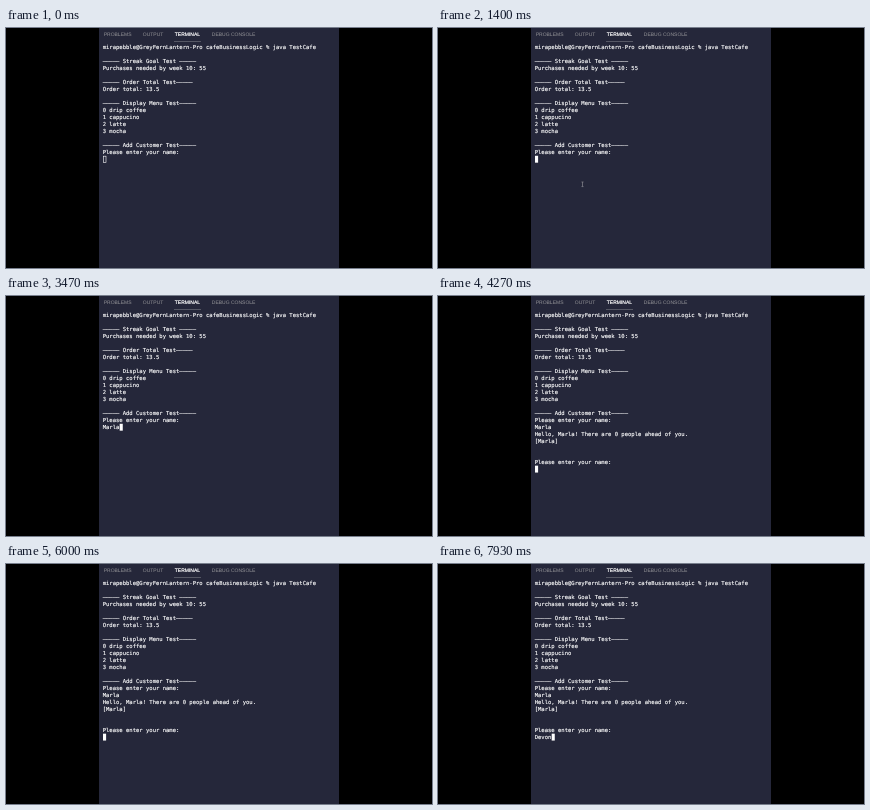
These frames come from a looping animation (426 by 240 pixels, 8 s). An HTML page with a canvas:

```html
<!DOCTYPE html>
<html lang="en">
<head>
<meta charset="utf-8">
<title>Terminal session</title>
<style>
  html, body { margin: 0; width: 100%; height: 100%; overflow: hidden; background: #000; }
  canvas { display: block; width: 426px; height: 240px; }
</style>
</head>
<body>
<canvas id="stage"></canvas>
<script>
const W = 426, H = 240, LOOP = 8000;
const PANEL = { x: 93, w: 240, color: '#25273a' };
const CELL = { x: 96.7, y: 19.4, w: 3.333, h: 6.98 };
const RULE = '—'.repeat(5);

const canvas = document.getElementById('stage');
const ctx = canvas.getContext('2d');
const dpr = window.devicePixelRatio || 1;
canvas.width = W * dpr;
canvas.height = H * dpr;

const INTRO = [
  'mirapebble@GreyFernLantern-Pro cafeBusinessLogic % java TestCafe',
  '',
  `${RULE} Streak Goal Test ${RULE}`,
  'Purchases needed by week 10: 55',
  '',
  `${RULE} Order Total Test${RULE}`,
  'Order total: 13.5',
  '',
  `${RULE} Display Menu Test${RULE}`,
  '0 drip coffee',
  '1 cappucino',
  '2 latte',
  '3 mocha',
  '',
  `${RULE} Add Customer Test${RULE}`,
  'Please enter your name:'
];

const FIRST = { name: 'Marla', keys: [2250, 2450, 2650, 2870, 3050], enter: 3550 };
const SECOND = { name: 'Devon', keys: [6800, 7000, 7220, 7420, 7620] };
const REPLY = [
  `Hello, ${FIRST.name}! There are 0 people ahead of you.`,
  `[${FIRST.name}]`,
  '',
  '',
  'Please enter your name:'
];

const FOCUS_AT = 1100;
const POINTER = { from: 800, to: 2000, x: 144.5, y: 156.3 };

const TABS = [
  ['PROBLEMS', 97.7],
  ['OUTPUT', 136.8],
  ['TERMINAL', 168.8],
  ['DEBUG CONSOLE', 205.8]
];

function typed(entry, t) {
  return entry.name.slice(0, entry.keys.filter(k => k <= t).length);
}

function screenAt(t) {
  const lines = [...INTRO, typed(FIRST, t)];
  return t < FIRST.enter ? lines : [...lines, ...REPLY, typed(SECOND, t)];
}

// Large font drawn under a small scale keeps glyphs on fractional positions.
function drawText(text, x, y, font) {
  ctx.save();
  ctx.translate(x, y);
  ctx.scale(0.1, 0.1);
  ctx.font = font;
  ctx.fillText(text, 0, 0);
  ctx.strokeText(text, 0, 0);
  ctx.restore();
}

function drawTabs() {
  for (const [label, x] of TABS) {
    const active = label === 'TERMINAL';
    ctx.fillStyle = ctx.strokeStyle = active ? '#fff' : '#8b8b90';
    ctx.lineWidth = active ? 2 : 0.6;
    drawText(label, x, 8.1, '50px "Liberation Sans", Arial, sans-serif');
  }
  ctx.fillStyle = '#777983';
  ctx.fillRect(168, 13, 27, 0.6);
}

function drawLine(text, row) {
  const y = CELL.y + row * CELL.h + 2;
  [...text].forEach((ch, col) => {
    if (ch !== ' ') {
      drawText(ch, CELL.x + col * CELL.w, y, '55.4px "DejaVu Sans Mono", monospace');
    }
  });
}

function drawCursor(col, row, focused) {
  const x = CELL.x + 0.3 + col * CELL.w;
  const y = CELL.y + row * CELL.h - 3.3;
  if (focused) {
    ctx.fillRect(x, y, 3.1, 6.9);
  } else {
    ctx.lineWidth = 0.6;
    ctx.strokeRect(x + 0.3, y + 0.4, 2.7, 6.2);
  }
}

function drawPointer() {
  const { x, y } = POINTER;
  ctx.strokeStyle = '#9a9a9f';
  ctx.lineWidth = 0.6;
  ctx.beginPath();
  ctx.moveTo(x, y - 2.2);
  ctx.lineTo(x, y + 2.2);
  for (const end of [-2.3, 2.3]) {
    ctx.moveTo(x - 1, y + end);
    ctx.lineTo(x + 1, y + end);
  }
  ctx.stroke();
}

function draw(t) {
  ctx.setTransform(dpr, 0, 0, dpr, 0, 0);
  ctx.textRendering = 'geometricPrecision';
  ctx.textBaseline = 'alphabetic';
  ctx.fillStyle = '#000';
  ctx.fillRect(0, 0, W, H);
  ctx.fillStyle = PANEL.color;
  ctx.fillRect(PANEL.x, 0, PANEL.w, H);
  drawTabs();

  const lines = screenAt(t);
  ctx.fillStyle = ctx.strokeStyle = '#fff';
  ctx.lineWidth = 1.4;
  lines.forEach(drawLine);
  const last = lines.length - 1;
  drawCursor(lines[last].length, last, t >= FOCUS_AT);

  if (t >= POINTER.from && t < POINTER.to) drawPointer();
}

const start = performance.now();
function tick() {
  draw((performance.now() - start) % LOOP);
  requestAnimationFrame(tick);
}
tick();
</script>
</body>
</html>
```
